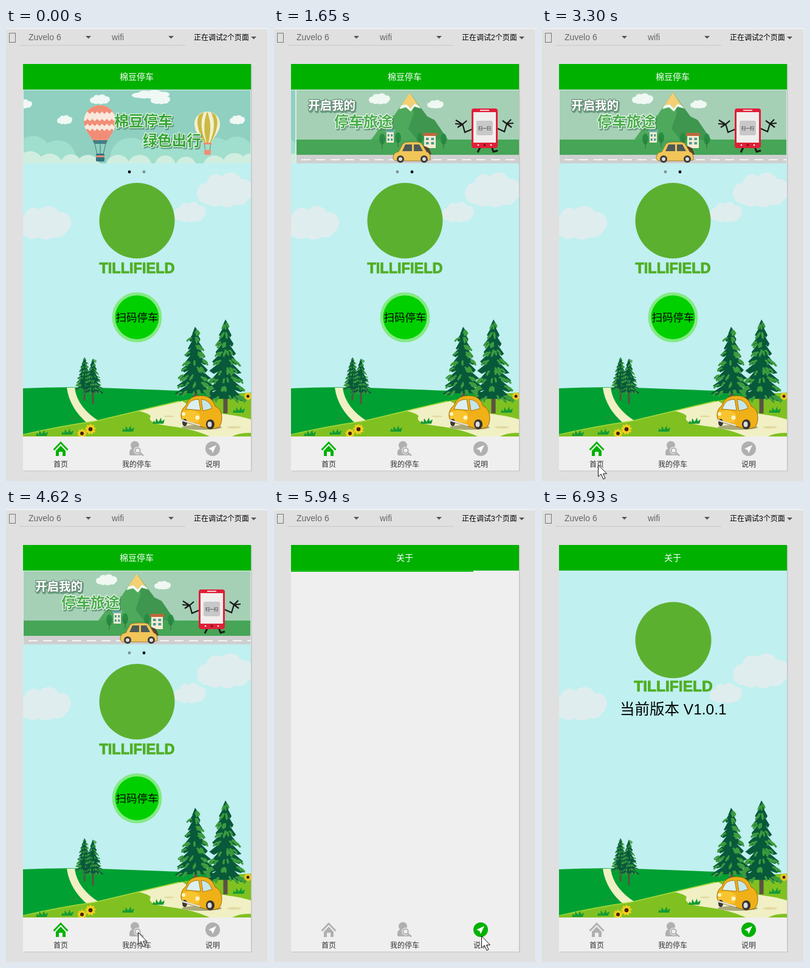
Write an HTML page that moves like this. It is 431 px wide and 743 px high and loops after 9.24 s.

```html
<!DOCTYPE html>
<html lang="zh-CN">
<head>
<meta charset="utf-8">
<title>停车</title>
<style>
  html, body { margin: 0; width: 100%; height: 100%; overflow: hidden; background: #e0e0e0; }
  svg { display: block; width: 431px; height: 743px; }
  text { font-family: "Liberation Sans", "Noto Sans CJK SC", "Noto Sans CJK", sans-serif; white-space: pre; }
  .num { font-family: "Noto Sans", "Open Sans", "Noto Sans CJK SC", sans-serif; }
  .mid { text-anchor: middle; }
  .slogan { font-weight: 900; paint-order: stroke; stroke-linejoin: round; }
  .brand { font-weight: 700; fill: #4fae22; stroke: #4fae22; stroke-width: .9; text-anchor: middle; }
  .tab { fill: currentColor; }
</style>
</head>
<body>
<svg id="stage" viewBox="0 0 431 743"></svg>
<script>
const LOOP = 9240, GREEN = '#00b100', GREY = '#b0b0b0';
const BRAND = '棉豆停车', WORDMARK = 'TILLIFIELD';

let seed = 7;
const random = () => (seed = seed * 16807 % 2147483647) / 2147483647;
const repeat = (n, make) => Array.from({ length: n }, (_, i) => make(i)).join('');

const rect = (x, y, w, h, fill, more = '') => `<rect x="${x}" y="${y}" width="${w}" height="${h}" fill="${fill}" ${more}/>`;
const oval = (x, y, rx, ry, fill, more = '') => `<ellipse cx="${x}" cy="${y}" rx="${rx}" ry="${ry}" fill="${fill}" ${more}/>`;
const disc = (x, y, r, fill, more) => oval(x, y, r, r, fill, more);
const path = (d, fill, more = '') => `<path d="${d}" fill="${fill}" ${more}/>`;
const line = (d, color, width, more = '') => path(d, 'none', `stroke="${color}" stroke-width="${width}" ${more}`);
const text = (x, y, size, fill, words, more = '') => `<text x="${x}" y="${y}" font-size="${size}" fill="${fill}" ${more}>${words}</text>`;
const group = (id, body, more = '') => `<g id="${id}" ${more}>${body}</g>`;

// Puffy cloud inside the box x, y, w, h
const cloud = (x, y, w, h, fill) =>
  [[.16, .6, .16, .3], [.34, .35, .17, .3], [.6, .3, .2, .3], [.83, .5, .17, .32],
   [.32, .7, .18, .28], [.55, .7, .2, .3], [.75, .7, .17, .24], [.5, .5, .3, .3]]
    .map(([cx, cy, rx, ry]) => oval(x + cx * w, y + cy * h, rx * w, ry * h, fill)).join('');

// Fir with ragged, drooping tiers and light needle streaks
function pine(x, top, foot, half, trunkEnd) {
  const tiers = 9, step = (foot - top) / tiers, left = [], right = [];
  let needles = '';
  for (let i = 1; i <= tiers; i++) {
    const y = top + step * i, reach = half * (i / tiers) ** .85;
    const edge = side => {
      const tip = x + side * reach * (.8 + random() * .2);
      return [`${tip} ${y - random() * step * .5}`, `${x + side * reach * .7} ${y}`, `${x + side * reach * .42} ${y - step * .25}`];
    };
    right.push(...edge(1));
    left.unshift(...edge(-1).reverse());
    for (let k = 0; k < 2 + i; k++) {
      const s = random() * 1.7 - .85;
      needles += `M${x + s * reach * .8} ${y - step * (.25 + random() * .4)}q${s * half * .12} 0 ${s * half * .24} ${step * .35}`;
    }
  }
  return rect(x - half * .09, foot - step, half * .18, trunkEnd - foot + step, '#5b5242') +
    path(`M${x} ${top}L${right.join('L')}L${left.join('L')}Z`, '#07593a') +
    line(needles, '#3d9c3e', half * .085, 'stroke-linecap="round"');
}

const sunflower = (x, y, r) =>
  repeat(9, i => oval(x, y - r * .65, r * .25, r * .45, '#f4cf20', `transform="rotate(${i * 40} ${x} ${y})"`)) +
  disc(x, y, r * .42, '#40220c');

const tuft = (x, y) => path(`M${x - 9} ${y}l2-5 3 3 1-7 4 6 4-7 1 6 5-3-2 7z`, '#129a35');

const roundCar = () =>
  oval(322, 655, 33, 4, '#a8a878') +
  path('M288 637Q287 626 296 619Q301 603 320 603Q339 603 344 620Q354 624 355 638Q355 650 350 655L336 658L296 647Q289 645 288 637Z', '#f0b018', 'stroke="#9a6a10"') +
  path('M299 619Q303 609 317 609L320 627L296 625Z', '#dcf0f2', 'stroke="#a87910"') +
  path('M321 609Q335 610 339 624L324 628Z', '#c6e6ea', 'stroke="#a87910"') +
  path('M291 630Q305 623 319 633L317 647Q300 648 290 640Z', '#f8c530') +
  oval(294, 647, 4, 6, '#383838') + oval(336, 650, 7, 8, '#333') + oval(335, 650, 3.5, 4.5, '#ddd') +
  disc(292, 633, 3, '#fff4c0') + disc(315, 639, 3.5, '#fff4c0') +
  line('M288 643L319 652', '#ddd', 2.5);

const scene = () =>
  rect(28, 101, 375, 569, '#c0f0f0') +
  cloud(314, 237, 92, 57, '#dfedee') + cloud(276, 285, 53, 34, '#dfedee') + cloud(14, 292, 93, 55, '#dfedee') +
  path('M28 591Q90 588 150 590T290 595T403 600V670H28Z', '#00a032') +
  path('M100 590H113Q115 607 126 621T152 644L136 650Q105 625 100 590Z', '#f0f0c4') +
  path('M28 668Q88 652 146 645L285 612Q350 600 403 598V670H28Z', '#80c121') +
  path('M217 628L290 612Q315 628 350 632T403 642V664Q384 663 372 670H335Q310 658 270 653T238 637Q236 632 217 628Z', '#f0f0c4') +
  line('M28 667Q88 653 146 645L285 612', '#a5d93b', 1.5) +
  tuft(110, 643) + tuft(58, 669) + tuft(250, 649) + tuft(200, 662) + tuft(382, 631) + tuft(100, 667) +
  oval(268, 637, 9, 1.5, '#e3d9a0') + oval(375, 655, 12, 2, '#e3d9a0') +
  pine(129, 540, 594, 17, 611) + pine(143, 542, 600, 18, 617) +
  pine(311, 490, 602, 36, 607) + pine(361, 478, 612, 39, 632) +
  roundCar() + sunflower(125, 665, 7) + sunflower(139, 658, 8) + sunflower(398, 604, 6);

const slogan = (x, y, size, words, fill, edge) =>
  text(x + 1.5, y + 1.5, size, '#3f7a58', words, 'class="slogan" stroke="#3f7a58" stroke-width="3" opacity=".6"') +
  text(x, y, size, fill, words, `class="slogan" stroke="${edge}" stroke-width="2.5"`);

const slideEdge = rect(28.5, 101.5, 374, 121, 'none', 'stroke="#d9ece6"');

function balloonSlide() {
  const zigzag = (y, h) => `M126 ${y}${repeat(7, () => 'l4 4 4-4')}v${h}${repeat(7, () => 'l-4 4-4-4')}z`;
  return rect(28, 101, 375, 121, '#8fd0c1') +
    [[45, 205, 28], [85, 214, 30], [205, 214, 34], [255, 213, 35], [301, 207, 32], [345, 210, 30], [380, 205, 27]]
      .map(([x, y, r]) => disc(x, y, r, '#a0decd')).join('') +
    [[40, 224, 22], [72, 228, 22], [107, 224, 17], [135, 228, 20], [184, 228, 20], [220, 228, 20], [262, 226, 17], [296, 228, 17], [343, 228, 19], [376, 225, 20], [402, 224, 18]]
      .map(([x, y, r]) => disc(x, y, r, '#d0eee0')).join('') +
    [[138, 109, 33, 16], [207, 102, 62, 14], [238, 109, 32, 16], [84, 143, 25, 15], [368, 143, 25, 15], [14, 117, 29, 15]]
      .map(box => cloud(...box, '#eff8f5')).join('') +
    '<clipPath id="envelope"><path d="M128 153A26.500 26.500 0 0 1 181 153C181 168 169 178 165 190H145C141 178 128 168 128 153Z"/></clipPath>' +
    `<g clip-path="url(#envelope)">${rect(126, 125, 58, 68, '#f9e8dc')}${path(zigzag(120, 17) + zigzag(149, 8) + zigzag(165, 18), '#f18d76')}${rect(126, 184, 58, 9, '#427f86')}</g>` +
    line('M146 190L150 207M164 190L160 207M155 190V207', '#47777c', 1) +
    rect(148, 206, 14, 13, '#35747f', 'rx="2"') + rect(148, 209, 14, 3, '#f18d76') +
    path('M310 157A21 20 0 0 1 352 157C352 172 340 180 338 188H325C322 180 310 172 310 157Z', '#f4efcf') +
    path('M318 142Q309 157 326 188L329 188Q316 158 326 138ZM331 137Q322 160 330 188H333Q340 160 331 137ZM344 142Q354 157 337 188L335 188Q348 158 337 138Z', '#c9ba45') +
    line('M326 188L328 201M337 188L335 201', '#8a8055', 1) +
    rect(325, 188, 13, 3, '#f18d76') + rect(326, 200, 11, 8, '#f18d76', 'rx="2"') +
    slogan(178, 161, 24, BRAND, '#37a637', '#e8f8e8') + slogan(225, 193, 24, '绿色出行', '#37a637', '#e8f8e8') + slideEdge;
}

const house = (x, y, w, h, roof) =>
  rect(x, y, w, h, '#f7ecd2') + rect(x - 2, y - 4, w + 4, 5, roof) +
  [.15, .6].map(k => rect(x + w * k, y + 4, w * .25, 4, '#4b9d95') + rect(x + w * k, y + 11, w * .25, 4, '#4b9d95')).join('');

const bush = (x, y) => oval(x, y, 5, 9, '#278d43') + line(`M${x} ${y}v16`, '#41633a', 1);

const roadSlide = () =>
  rect(28, 101, 375, 121, '#a5d0b6') +
  path('M143 195L177 149L190 143L215 106L244 145L256 151L286 195Z', '#4fa95c') +
  path('M215 106L222 139L213 165L236 195H286L256 151L244 145Z', '#3f964f') +
  path('M201 127L215 106L230 127L223 124L217 132L210 125Z', '#f5cf73') +
  path('M201 127L210 125L217 132L223 124L230 127L234 132L223 129L217 137L209 130L198 133Z', '#f5faf0') +
  rect(28, 183, 375, 26, '#46a556') + rect(28, 208, 375, 14, '#cfcfcf') +
  line('M37 216H403', '#fff', 1.5, 'stroke-dasharray="15 9"') +
  cloud(148, 107, 35, 18, '#eff8f2') + cloud(244, 118, 27, 14, '#eff8f2') +
  house(177, 170, 12, 18, '#6cb4ac') + house(239, 176, 19, 21, '#bb683c') +
  bush(170, 182) + bush(196, 180) + bush(232, 181) + bush(271, 182) +
  path('M238 193l9 4 4 10-9 2z', '#554334') +
  path('M188 215Q187 204 197 203L204 190Q207 187 214 187H229Q234 187 237 193L243 203Q250 205 249 216L243 218H192Z', '#f1c557', 'stroke="#8a6b2c" stroke-width=".8"') +
  path('M203 202L208 191H219V202ZM222 191H231L237 202H222Z', '#4d5a57') +
  [200, 239].map(x => disc(x, 215, 6, '#3b3b3b') + disc(x, 215, 3, '#ddd')).join('') +
  line('M318 166L306 171L302 157M302 158L291 151M302 158L290 157M302 158L294 163M302 158L309 152M360 165L371 170L375 157M375 157L368 152M375 157L382 150M375 157L386 156M375 157L383 163', '#181818', 2.2) +
  line('M331 196L327 204M350 195L353 203L360 201', '#181818', 3) +
  rect(317, 132, 43, 65, '#df2038', 'rx="4"') + rect(320, 138, 37, 50, '#f1eeee') +
  rect(325, 152, 27, 24, '#c8c8c8', 'rx="3"') +
  text(338.5, 167, 7, '#222', '扫一扫', 'class="mid"') +
  line('M331 135H346', '#fff', 1.5) + disc(338.5, 192, 2, '#7c101d') + disc(328, 192, 1.3, '#fff') + disc(349, 192, 1.3, '#fff') +
  slogan(48, 134, 19.500, '开启我的', '#fff', '#6c8f7c') + slogan(91, 162, 24, '停车旅途', '#4aad4d', '#eefaee') + slideEdge;

const home = () =>
  `<g clip-path="url(#banner)"><g id="slides">${balloonSlide()}<g transform="translate(375)">${roadSlide()}</g></g></g>` +
  disc(203, 236, 2.4, '#000', 'id="dot0"') + disc(227, 236, 2.4, '#000', 'id="dot1"') +
  disc(215.5, 316, 62, '#5cb030') + text(215.5, 402, 23.500, '', WORDMARK, 'class="brand"') +
  disc(215.5, 474.5, 41, '#84ea84') + disc(215.5, 474.5, 36, '#00d000') +
  text(215.5, 480.5, 17.500, '#000', '扫码停车', 'class="mid" font-weight="500"');

const records = [['16:34', 4, 'A1 02', 13], ['15:32', 0, 'A1 09', '01'], ['15:27', 0, 'A1 02', '01'],
  ['15:24', 2, 'A1 09', '08'], ['15:22', 0, 'A1 09', '01'], ['14:58', 4, 'A2 14', 13]];

const history = () => rect(28, 101, 375, 569, '#efefef') + records.map(([time, cost, place, seconds], i) =>
  `<g transform="translate(0 ${i * 101})">` +
  disc(48.5, 117.5, 6.8, 'none', `stroke="${GREEN}" stroke-width="1.3"`) + line('M48.500 113V118H53', GREEN, 1.3) +
  text(66, 124.5, 19.400, '#000', `2016/12/16 ${time}`, 'class="num"') +
  text(41, 161.5, 13, '#808080', '停车消费') +
  text(103.5, 162, 28, '#f0d000', '¥', 'class="num"') + text(125, 162, 28, '#f0d000', cost, 'class="num"') +
  text(159, 161.5, 13, '#808080', '停车位置') + text(216, 162, 28, '#000', place, 'class="num"') +
  text(41, 189, 15, '#000', '停车时长') + text(119, 189, 15, '#000', `00:00:00:${seconds}`, 'class="num"') +
  line('M37 197Q38 199 41 199H390Q393 199 394 197', '#d6d6d6', 1.6) + '</g>').join('');

const about = () =>
  disc(216, 215, 62.5, '#5cb030') + text(216, 298.5, 24.500, '', WORDMARK, 'class="brand"') +
  text(128, 337, 24.500, '#000', '当前版本 V1.0.1', 'font-weight="300"');

const arrow = (x, y) => path(`M${x} ${y}h9l-4.500 4.500z`, '#555');

const toolbar = () =>
  rect(0, 0, 431, 743, '#e0e0e0') + rect(0, 0, 431, 2, '#efefef') + rect(430, 0, 1, 743, '#ececec') +
  rect(5.5, 8.5, 10, 15, 'none', 'stroke="#777"') +
  line('M23 28.500H295', '#c8c8c8', 1) + arrow(131, 13) + arrow(267, 13) + arrow(403, 14) +
  text(37, 20, 14, '#666', 'Zuvelo 6') + text(174, 20, 14, '#666', 'wifi') +
  text(309, 20, 12, '#000', '', 'id="debug"');

const INK = 'currentColor';
const tabBar = () =>
  rect(28, 670, 375, 56, '#efefef') +
  group('tab0', path('M77.500 691L90 678L102.500 691L100.500 693L90 682L79.500 693Z', INK) +
    path('M82 693.500L90 685L98 693.500V702H93V695H87V702H82Z', INK)) +
  group('tab1', oval(212, 684.5, 7, 7, INK) + path('M203 699Q202 689 211 689Q221 689 222 701H206Q203 701 203 699Z', INK) +
    disc(216.5, 693, 6.3, '#efefef') + disc(216.5, 693, 4.2, 'none', `stroke="${INK}" stroke-width="2"`) +
    line('M220 696.500L226 701.500', INK, 2.6)) +
  group('tab2', disc(340, 690, 12, INK) + path('M346 684L333 690L338 692L340 697Z', '#fff')) +
  ['首页', '我的停车', '说明'].map((name, i) => text(90 + 125 * i, 720, 12, '#333', name, 'class="mid"')).join('');

document.getElementById('stage').innerHTML =
  `<clipPath id="banner">${rect(28, 101, 375, 121)}</clipPath><clipPath id="phone">${rect(28, 59, 375, 667)}</clipPath>` +
  toolbar() + rect(29, 60, 375.5, 667, '#c4c4c4') +
  `<g clip-path="url(#phone)">${rect(28, 59, 375, 667, '#efefef')}` +
  group('scene', scene()) + group('home', home()) + group('history', history()) + group('about', about()) +
  rect(28, 59, 375, 42, GREEN) + rect(28, 100, 300, 3, '#18bb18', 'id="loading"') +
  text(215, 85, 14, '#fff', '', 'id="title" class="mid"') + tabBar() + '</g>' +
  group('cursor', path('M.5.500V20L5 15.500L9 24L12 22.500L8.500 15H14.500Z', '#fff', 'stroke="#111" stroke-linejoin="round"'));

// Each key: start time, then values held until the next key
const pages = [[0, 'home', BRAND, 0], [4950, 'history', '停车记录界面', 1], [5940, 'loading', '关于', 2], [6270, 'about', '关于', 2]];
const slideKeys = [[0, 0], [990, 69], [1320, 294], [1650, 367], [1980, 375]];
const cursorKeys = [[0], [2640, 343, 14], [2970, 121, 715], [3300, 92, 716], [3630, 89, 716], [3960, 97, 713],
  [4290, 207, 685], [4620, 217, 694], [5280, 317, 707], [5610, 341, 700], [6930]];

const held = (keys, t) => keys.filter(key => key[0] <= t).pop();
const el = id => document.getElementById(id);
const show = (id, on) => el(id).style.display = on ? '' : 'none';

function draw(t) {
  const [, page, title, tab] = held(pages, t);
  for (const id of ['home', 'history', 'loading', 'about']) show(id, id === page);
  show('scene', page === 'home' || page === 'about');
  el('title').textContent = title;
  el('debug').textContent = `正在调试${t < 5610 ? 2 : 3}个页面`;
  for (let i = 0; i < 3; i++) el('tab' + i).style.color = i === tab ? GREEN : GREY;

  el('slides').setAttribute('transform', `translate(${-held(slideKeys, t)[1]})`);
  const active = t < 990 ? 0 : 1;
  for (let i = 0; i < 2; i++) el('dot' + i).setAttribute('fill', i === active ? '#000' : '#7f8f8f');

  const [, x, y] = held(cursorKeys, t);
  show('cursor', x !== undefined);
  if (x !== undefined) el('cursor').setAttribute('transform', `translate(${x} ${y})`);
}

const start = performance.now();
function tick() {
  draw((performance.now() - start) % LOOP);
  requestAnimationFrame(tick);
}
draw(0);
requestAnimationFrame(tick);
</script>
</body>
</html>
```
